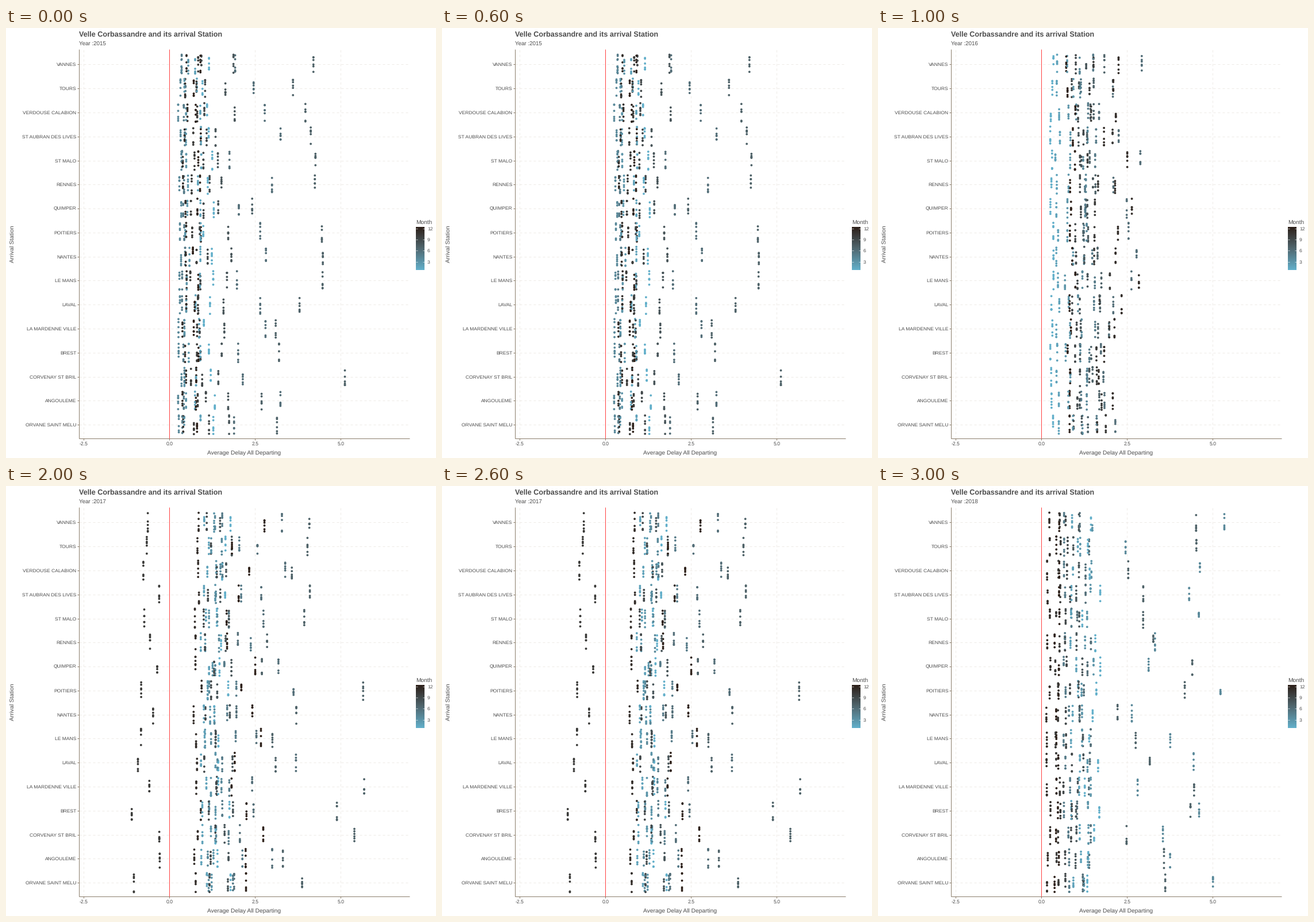
A matplotlib script for the animation above (4000 ms loop, 748 by 748 pixels).

```python
import matplotlib.pyplot as plt
import numpy as np
from matplotlib.animation import FuncAnimation
from matplotlib.colors import LinearSegmentedColormap

SIZE, DPI = 748, 100
PT = 72 / DPI  # points per pixel
LEFT, RIGHT, TOP, BOTTOM = 127.5, 702, 37, 713.5
ZERO_X, UNIT = 284, 59.6
ROW_Y, ROW_STEP = 62.3, 41.8
DOTS_PER_MONTH = 6

STATIONS = [
    "VANNES", "TOURS", "VERDOUSE CALABION", "ST AUBRAN DES LIVES", "ST MALO",
    "RENNES", "QUIMPER", "POITIERS", "NANTES", "LE MANS", "LAVAL",
    "LA MARDENNE VILLE", "BREST", "CORVENAY ST BRIL", "ANGOULEME",
    "ORVANE SAINT MELU",
]
INK, AXIS, GRID = "#4d4d4d", "#8b7d6b", "#eeebe6"
MONTH_CMAP = LinearSegmentedColormap.from_list(
    "month", ["#62afca", "#50676f", "#2d2019"])

# Key months and their typical delay; the months between are interpolated.
SEASONS = {
    2015: {1: 1.15, 3: .5, 4: .3, 5: .4, 6: 2.5, 7: 3.8, 8: 1.6, 9: 1, 11: .45, 12: .8},
    2016: {1: .3, 2: .48, 4: 1.15, 5: 1.4, 6: 2.3, 7: 1.55, 9: 1.05, 11: 2.3, 12: .85},
    2017: {1: 1.5, 2: 1, 4: 1.35, 6: 2.8, 7: 4.2, 8: 1.6, 9: 1.2, 10: -.7, 11: .8, 12: 2.2},
    2018: {1: 1.45, 2: 1, 3: 1.3, 4: 3.9, 5: .75, 6: 1.25, 7: 3.4, 8: 1.05, 11: .2, 12: .45},
}


def to_x(delay):
    return ZERO_X + UNIT * delay


def make_dots(year):
    """Positions and months of all dots, in random drawing order."""
    rng = np.random.default_rng(year)
    season = SEASONS[year]
    shape = (len(STATIONS), 12, DOTS_PER_MONTH)
    row, month, _ = np.indices(shape)
    typical = np.interp(np.arange(1, 13), list(season), list(season.values()))
    # Unusual months vary most from station to station.
    unusual = np.maximum(0, np.abs(typical - 0.8) - 0.5)
    spread = 0.1 * np.abs(typical) + 0.18 * unusual
    delay = typical + spread * rng.uniform(-1.7, 1.7, shape[:2])
    x = np.broadcast_to(to_x(delay)[..., None], shape)
    y = ROW_Y + ROW_STEP * (row + rng.uniform(-0.4, 0.4, shape))
    order = rng.permutation(x.size)
    points = np.column_stack([x.ravel(), y.ravel()]) + 0.5
    return points[order], month.ravel()[order] + 1


YEARS = [(year, *make_dots(year)) for year in SEASONS]

plt.rcParams["font.family"] = "Liberation Sans"
plt.rcParams["text.hinting"] = "none"
fig = plt.figure(figsize=(SIZE / DPI, SIZE / DPI), dpi=DPI, facecolor="white")
ax = fig.add_axes([0, 0, 1, 1])


def label(x, y, text, size, **style):
    style = {"color": INK, "va": "baseline", **style}
    return ax.text(x, y, text, fontsize=size * PT, **style)


def line(xs, ys, color, **style):
    style = {"lw": PT, "solid_capstyle": "butt", **style}
    ax.plot(xs, ys, color=color, **style)


# Grid, axes and tick labels
dashes = {"linestyle": (0, (4, 4)), "zorder": 1}
for i, name in enumerate(STATIONS):
    y = round(ROW_Y + ROW_STEP * i) + 0.5
    line([LEFT, RIGHT], [y, y], GRID, **dashes)
    line([LEFT - 3, LEFT], [y, y], AXIS)
    label(122.5, y + 3, name, 8.5, ha="right")
for value in (-2.5, 0, 2.5, 5):
    x = round(to_x(value)) + 0.5
    line([x, x], [BOTTOM, TOP], GRID, **dashes)
    line([x, x], [BOTTOM, BOTTOM + 3], AXIS)
    label(x, 725.5, f"{value:.1f}", 8.6, ha="center")
line([LEFT, LEFT], [TOP, BOTTOM], AXIS, zorder=4)
line([LEFT, RIGHT], [BOTTOM, BOTTOM], AXIS, zorder=4)
line([ZERO_X + 0.5] * 2, [TOP, BOTTOM], "#ff4040", zorder=4)

# Titles
label(127, 15, "Velle Corbassandre and its arrival Station", 12.6, weight="bold")
subtitle = label(127, 31, "", 9.8)
label(414.5, 741.5, "Average Delay All Departing", 10.3, ha="center")
label(14, 375.5, "Arrival Station", 10.4, ha="center", rotation=90,
      rotation_mode="anchor")

# Month legend
label(713, 340.5, "Month", 10.1)
ax.imshow(np.linspace(12, 1, 75)[:, None], cmap=MONTH_CMAP, vmin=1, vmax=12,
          extent=(713, 728, 421, 346), aspect="auto", zorder=2)
for month in (3, 6, 9, 12):
    y = 348.5 + 6.45 * (12 - month)
    for x in (713, 725):
        line([x, x + 3], [y, y], "white", lw=0.6 * PT, zorder=3)
    label(733, y + 3, str(month), 8.5)

dots = ax.scatter([], [], s=(3.8 * PT) ** 2, c=[], cmap=MONTH_CMAP,
                  vmin=1, vmax=12, linewidths=0, zorder=3)
ax.set_xlim(0, SIZE)
ax.set_ylim(SIZE, 0)
ax.axis("off")


def update(index):
    year, points, months = YEARS[index]
    subtitle.set_text(f"Year :{year}")
    dots.set_offsets(points)
    dots.set_array(months)
    return dots, subtitle


animation = FuncAnimation(fig, update, frames=len(YEARS), interval=1000,
                          repeat=True, repeat_delay=0)
plt.show()
```
